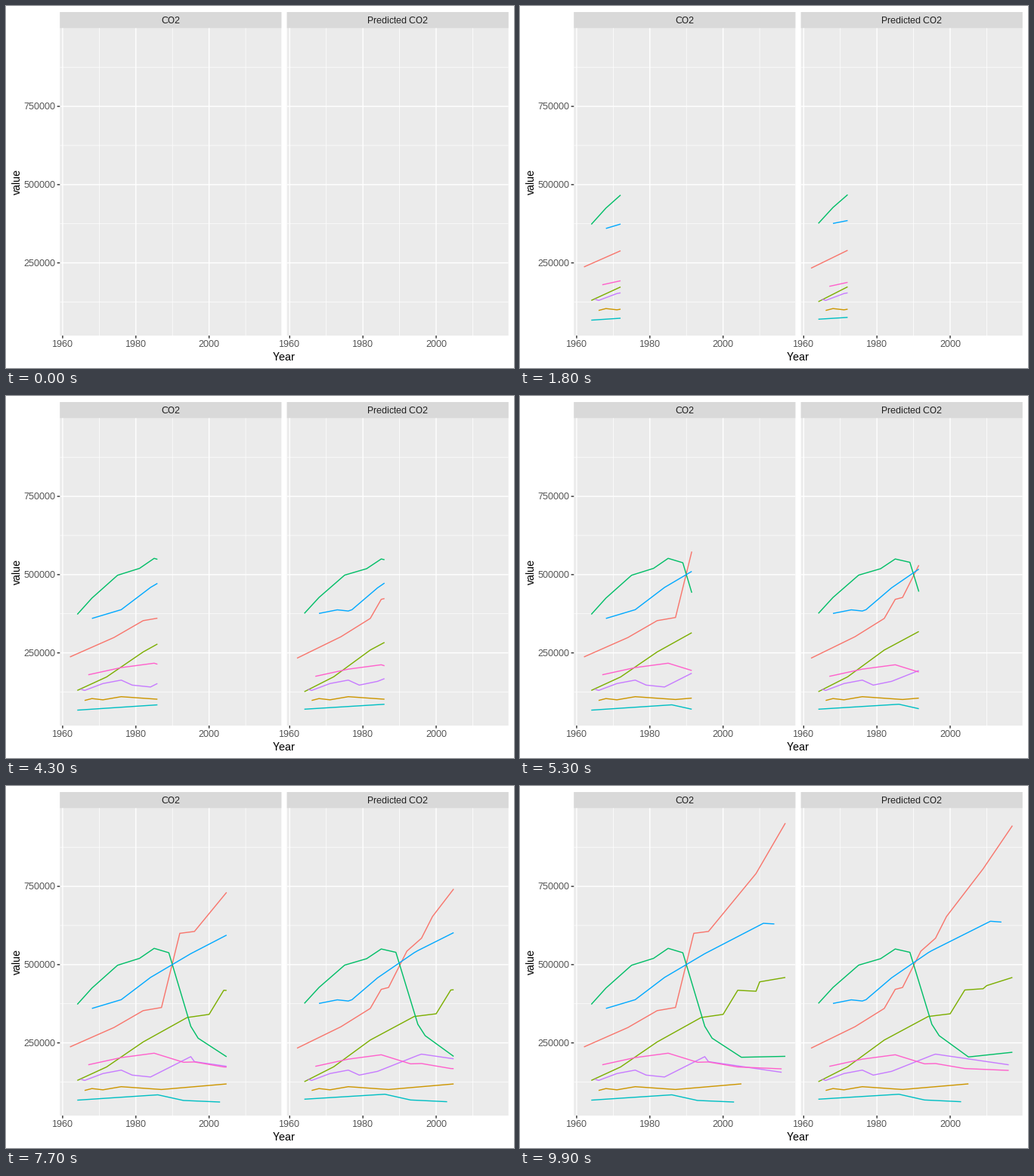
Animation, 672 px wide and 480 px high, one loop 10000 ms. Source, as a matplotlib script:

```python
import matplotlib.pyplot as plt
import numpy as np
from matplotlib.animation import FuncAnimation
from matplotlib.patches import Rectangle

W, H, DPI = 672, 480, 96
FRAMES = 100
FIRST, LAST = 1962, 2017
PANEL_W, STRIP_TOP, TOP, BOTTOM = 293, 8, 29.3, 437
PANELS = [(71.3, "CO2"), (371.67, "Predicted CO2")]
PX = 72 / DPI  # points per pixel

# Whole-pixel advances and no kerning
plt.rcParams.update({
    "font.family": "Liberation Sans",
    "text.hinting": "native",
    "text.hinting_factor": 1,
    "text.kerning_factor": 12,
    "path.simplify": False,
})

fig = plt.figure(figsize=(W / DPI, H / DPI), dpi=DPI, facecolor="white")
ax = fig.add_axes([0, 0, 1, 1])
ax.set(xlim=(0, W), ylim=(H, 0))
ax.axis("off")


def x_pos(year, left):
    return left + PANEL_W * ((year - FIRST) / (LAST - FIRST) + 0.05) / 1.1


def y_pos(value):
    """Value in thousands to pixels."""
    return 340.6 - (value - 250) * 103.75 / 250


def rect(x0, y0, x1, y1, color):
    ax.add_patch(Rectangle((x0, y0), x1 - x0, y1 - y0, fc=color, lw=0, snap=False))


def line(xs, ys, color, width=1.42, **kw):
    return ax.plot(xs, ys, color=color, lw=width * PX, solid_capstyle="butt",
                   solid_joinstyle="round", snap=False, **kw)[0]


def label(x, y, s, color="#4D4D4D", size=9, ha="center", **kw):
    ax.text(x, y, s, color=color, size=size, ha=ha, va="baseline", **kw)


def draw_panel(left, title):
    right = left + PANEL_W
    rect(left, STRIP_TOP, right, BOTTOM, "#EBEBEB")
    rect(left, STRIP_TOP, right, TOP, "#D9D9D9")
    label((left + right) / 2, 23, title, "#1A1A1A")
    for value in range(125, 1000, 250):
        line([left, right], [y_pos(value)] * 2, "white", 0.71)
    for year in range(1970, 2011, 20):
        line([x_pos(year, left)] * 2, [TOP, BOTTOM], "white", 0.71)
    for value in range(250, 1000, 250):
        line([left, right], [y_pos(value)] * 2, "white")
    for year in range(1960, 2001, 20):
        x = x_pos(year, left)
        line([x, x], [TOP, BOTTOM], "white")
        line([x, x], [BOTTOM, BOTTOM + 3.67], "#333333")
        label(x, 452, str(year))


for left, title in PANELS:
    draw_panel(left, title)
for value in range(250, 1000, 250):
    y = y_pos(value)
    line([PANELS[0][0] - 3.67, PANELS[0][0]], [y, y], "#333333")
    label(65, y + 4.2, f"{value}000", ha="right")
label(368, 470, "Year", "black", 11)
label(19, 233, "value", "black", 11, rotation=90, rotation_mode="anchor")

curves = []


def series(color, keys, bias):
    """One country: key points (year - 1900, thousands) and the model's bias."""
    key_years, key_values = np.transpose(keys)
    years = np.arange(key_years[0], key_years[-1] + 1)
    actual = np.interp(years, key_years, key_values)
    predicted = actual + np.interp(years, *np.transpose(bias))
    for (left, _), values in zip(PANELS, (actual, predicted)):
        curves.append((line([], [], color, zorder=3), left, years + 1900, values))


series("#F8766D",
       [(62, 237), (74, 299), (82, 353), (87, 363), (92, 600), (96, 606),
        (109, 791), (117, 952)],
       [(62, -4), (82, 7), (85, 62), (87, 64), (92, -57), (99, 5), (109, 15), (117, -8)])
series("#CD9600",
       [(66, 98), (68, 104), (71, 100), (76, 110), (87, 101), (105, 119)],
       [(66, 0)])
series("#7CAE00",
       [(64, 130), (72, 173), (82, 253), (94, 331), (100, 341), (104, 418),
        (109, 415), (110, 445), (117, 459)],
       [(64, -4), (82, 6), (104, 1), (109, 8), (110, -12), (117, 0)])
series("#00BE67",
       [(64, 373), (68, 425), (75, 498), (81, 520), (85, 552), (89, 538),
        (95, 303), (97, 265), (105, 204), (117, 207)],
       [(64, 3), (85, -2), (97, 8), (105, 1), (117, 13)])
series("#00BFC4",
       [(64, 67), (86, 84), (93, 66), (103, 61)],
       [(64, 3), (103, 1)])
series("#00A9FF",
       [(68, 360), (76, 388), (84, 459), (95, 535), (111, 632), (114, 630)],
       [(68, 16), (73, 10), (77, -9), (94, 10), (114, 6)])
series("#C77CFF",
       [(65, 134), (66, 130), (71, 152), (76, 163), (79, 147), (84, 141),
        (95, 206), (96, 190), (116, 156)],
       [(79, 0), (84, 18), (95, 4), (96, 24)])
series("#FF61CC",
       [(67, 180), (76, 203), (85, 217), (93, 188), (96, 189), (104, 173), (116, 167)],
       [(67, -5)])


def update(frame):
    now = FIRST + (LAST - FIRST) * frame / (FRAMES - 1)
    for artist, left, years, values in curves:
        if now <= years[0]:
            artist.set_data([], [])
            continue
        seen = years < now
        tip = min(now, years[-1])
        xs = np.append(years[seen], tip)
        ys = np.append(values[seen], np.interp(tip, years, values))
        artist.set_data(x_pos(xs, left), y_pos(ys))
    return [curve[0] for curve in curves]


anim = FuncAnimation(fig, update, frames=FRAMES, interval=100,
                     repeat=True, repeat_delay=0, blit=False)
plt.show()
```
